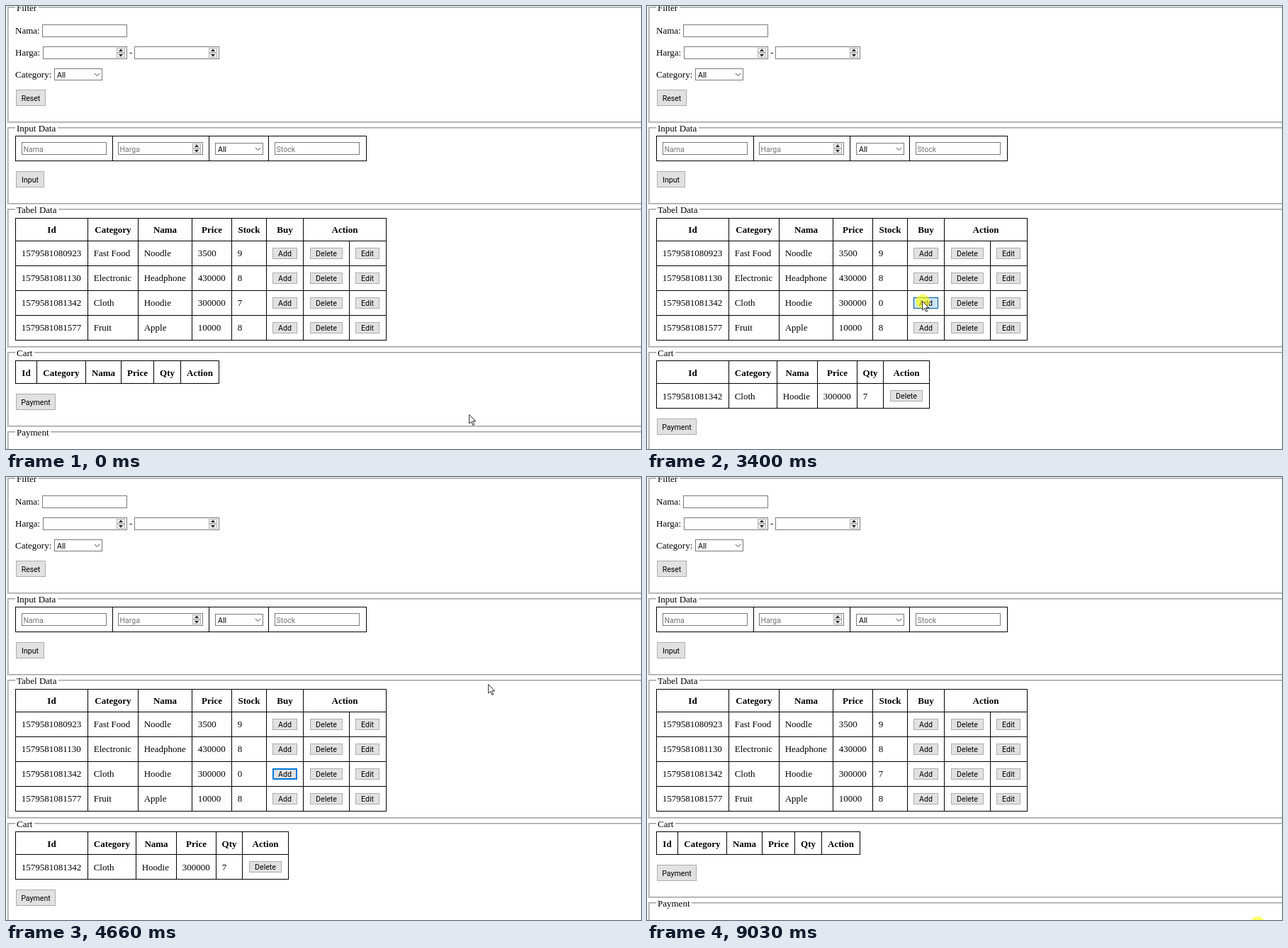
Write an HTML page that moves like this. It is 896 px wide and 625 px high and loops after 9180 ms.

```html
<!DOCTYPE html>
<html lang="id">
<head>
<meta charset="utf-8">
<title>Tabel Data</title>
<style>
  html, body { margin: 0; width: 100%; height: 100%; overflow: hidden; background: #fff; }
  svg { display: block; }
  text { font: 13px "Liberation Serif", "Times New Roman", serif; white-space: pre; }
  .th { font-weight: bold; }
  .ui { font: 10.6px Roboto, sans-serif; }
  .msg { font: 10px Roboto, sans-serif; }
  .mid { text-anchor: middle; }
</style>
</head>
<body>
<svg id="stage" width="896" height="625" viewBox="0 0 896 625"></svg>
<script>
const LOOP = 9180;
const stage = document.getElementById('stage');

// Mouse presses: [down, up]. The first seven each move one item to the cart.
const clicks = [[760, 910], [990, 1140], [1300, 1450], [1550, 1700], [1780, 1930], [2010, 2160],
  [2330, 2470], [3340, 3490], [4510, 4660], [6610, 6770], [9030, 9180]];
const ADDS = 7, DIALOG = [3490, 4660], REMOVED = 6770, HIDDEN = 8570;

// Pointer moves: first step, last step, step count, end point, optional bend.
const moves = [
  [70, 590, 8, 389, 416],
  [3810, 3960, 3, 737, 262],
  [4110, 4440, 5, 681, 292],
  [4740, 5530, 11, 377, 552],
  [5600, 5600, 1, 377.4, 552],
  [5770, 5770, 1, 378, 552],
  [7010, 7240, 4, 353, 418, 390, 475],
  [7320, 7620, 5, 344, 424, 346, 410],
  [8170, 8490, 5, 793, 590]
];

const goods = [
  ['1579581080923', 'Fast Food', 'Noodle', '3500', 9],
  ['1579581081130', 'Electronic', 'Headphone', '430000', 8],
  ['1579581081342', 'Cloth', 'Hoodie', '300000', 7],
  ['1579581081577', 'Fruit', 'Apple', '10000', 8]
];

const looks = {
  rest: ['#e1e1e1', '#adadad'],
  hover: ['#e5f1fb', '#0078d7'],
  down: ['#cce4f7', '#005499'],
  focus: ['#e1e1e1', '#0078d7']
};

const fill = (x, y, w, h, c) => `<rect x="${x}" y="${y}" width="${w}" height="${h}" fill="${c}"/>`;
const box = (x, y, w, h, bg, line) =>
  `<rect x="${x + .5}" y="${y + .5}" width="${w - 1}" height="${h - 1}" fill="${bg}" stroke="${line}"/>`;
const text = (x, y, s, cls = '', c = '#000') => `<text x="${x}" y="${y}" class="${cls}" fill="${c}">${s}</text>`;
const hline = (x1, x2, y, c = '#000') => fill(x1, y, x2 - x1 + 1, 1, c);
const vline = (x, y1, y2, c = '#000') => fill(x, y1, 1, y2 - y1 + 1, c);
const smooth = k => k * k * (3 - 2 * k);

function pointerAt(t) {
  let x = 654, y = 576;
  for (const [a, b, n, ex, ey, bx = (x + ex) / 2, by = (y + ey) / 2] of moves) {
    if (t < a) break;
    const step = b > a ? Math.min(n, Math.floor((t - a) / (b - a) * (n - 1) + .001) + 1) : n;
    const k = smooth(step / n), q = 1 - k;
    const px = q * q * x + 2 * q * k * bx + k * k * ex;
    const py = q * q * y + 2 * q * k * by + k * k * ey;
    if (t < b) return [px, py];
    x = ex; y = ey;
  }
  return [x, y];
}

function button(x, y, w, h, label, look = 'rest') {
  const [bg, line] = looks[look];
  return box(x, y, w, h, bg, line) +
    (look === 'focus' ? box(x + 1, y + 1, w - 2, h - 2, bg, line) : '') +
    text(x + w / 2, y + h / 2 + 4, label, 'ui mid');
}

const input = (x, y, w, hint = '') =>
  box(x, y, w, 18, '#fff', '#7a7a7a') + text(x + 2.5, y + 13.5, hint, 'ui', '#757575');

function spinner(x, y) {
  const half = top => box(x, top, 12, 7, '#f0f0f0', '#b4b4b4');
  return half(y) + half(y + 7) +
    `<path d="M${x + 3} ${y + 5}l3 -3.4l3 3.4zM${x + 3} ${y + 9}l3 3.4l3 -3.4z" fill="#222"/>`;
}

const select = (x, y) => box(x, y, 68, 17, '#fff', '#7a7a7a') + text(x + 4, y + 12.5, 'All', 'ui') +
  `<path d="M${x + 57} ${y + 7}l3.5 3.5l3.5 -3.5" fill="none" stroke="#444"/>`;

function fieldset(top, bottom, label, width) {
  let s = '';
  [['#a0a0a0', 0], ['#cecece', 1]].forEach(([c, d]) => {
    s += hline(2 + d, 12, top + d, c) + hline(15 + width + 2, 896, top + d, c) +
      vline(2 + d, top + d, bottom + 1 - d, c) + hline(2 + d, 896, bottom + d, c);
  });
  return s + text(15, top + 5.5, label);
}

function grid(xs, ys) {
  const [x1, x2] = [xs[0], xs[xs.length - 1]], [y1, y2] = [ys[0], ys[ys.length - 1]];
  return xs.map(x => vline(x, y1, y2)).join('') + ys.map(y => hline(x1, x2, y)).join('');
}

const heads = (xs, names, y) =>
  names.map((n, i) => text((xs[i] + xs[i + 1] + 1) / 2, y, n, 'th mid')).join('');
const cells = (xs, row, y) => row.map((v, i) => text(xs[i] + 8.7, y, v)).join('');

function scene(t) {
  const [mx, my] = pointerAt(t);
  const modal = t >= DIALOG[0] && t < DIALOG[1];
  const press = clicks.findIndex(([a, b]) => t >= a && t < b);
  const held = press >= 0 && (press > ADDS || t >= clicks[press][0] + 60);
  const qty = t < REMOVED ? clicks.slice(0, ADDS).filter(c => t >= c[1]).length : 0;
  const over = (x, y, w, h) => mx >= x && mx < x + w && my >= y && my < y + h;
  const live = (x, y, w, h, label, focus) => {
    const on = !modal && t < HIDDEN && over(x, y, w, h);
    const look = on ? (held ? 'down' : 'hover') : focus ? (modal ? 'hover' : 'focus') : 'rest';
    return button(x, y, w, h, label, look);
  };

  let s = fill(0, 0, 896, 625, '#fff');

  s += fieldset(1, 163, 'Filter', 29);
  s += text(13, 39, 'Nama:') + input(51, 26, 120);
  s += text(13, 70, 'Harga:') + input(52, 57, 119) + spinner(156, 59) + text(174, 70, '-') +
    input(181, 57, 120) + spinner(286, 59);
  s += text(13, 101, 'Category:') + select(68, 88) + live(14, 118, 42, 23, 'Reset');

  s += fieldset(171, 278, 'Input Data', 56);
  s += grid([13, 150, 286, 370, 508], [183, 218]);
  s += input(22, 192, 120, 'Nama') + input(158, 192, 120, 'Harga') + spinner(263, 194) +
    select(295, 193) + input(379, 192, 120, 'Stock') + live(14, 233, 40, 23, 'Input');

  s += fieldset(286, 480, 'Tabel Data', 57);
  const cols = [13, 115, 186, 262, 318, 367, 419, 536];
  s += grid(cols, [299, 331, 366, 401, 436, 471]) + vline(484, 331, 471);
  s += heads(cols, ['Id', 'Category', 'Nama', 'Price', 'Stock', 'Buy', 'Action'], 320);
  goods.forEach((item, i) => {
    const y = 341 + 35 * i, chosen = i === 2;
    const row = chosen ? [...item.slice(0, 4), item[4] - qty] : item;
    const focus = chosen && t >= clicks[0][0] && t < 6610;
    s += cells(cols, row, y + 12) + live(376, y, 35, 16, 'Add', focus) +
      live(429, y, 46, 16, 'Delete') + live(493, y, 34, 16, 'Edit');
  });

  const drop = qty ? 35 : 0;
  const cart = qty ? [13, 115, 183, 240, 296, 333, 398] : [13, 43, 112, 162, 208, 246, 300];
  s += fieldset(488, 592 + drop, 'Cart', 23);
  s += grid(cart, qty ? [500, 532, 567] : [500, 532]);
  s += heads(cart, ['Id', 'Category', 'Nama', 'Price', 'Qty', 'Action'], 522);
  if (qty) s += cells(cart, [...goods[2].slice(0, 4), qty], 555) + live(343, 542, 46, 16, 'Delete');
  s += live(14, 547 + drop, 56, 23, 'Payment');
  s += fieldset(600 + drop, 720, 'Payment', 46);

  if (modal) {
    const ok = [636, 288, 61, 18];
    s += fill(0, 0, 896, 625, 'rgba(26,26,26,.5)');
    s += box(523, 205, 195, 117, '#fff', '#777') + fill(524, 276, 193, 45, '#f0f0f0') +
      hline(524, 716, 275, '#dfdfdf');
    s += text(620.5, 244, 'Stock Habis', 'msg mid');
    s += button(...ok, 'OK', over(...ok) ? (held ? 'down' : 'hover') : 'focus');
  }

  if (press >= 0) {
    const [cx, cy] = t < HIDDEN ? [mx, my + .8] : [861.5, 630];
    s += `<circle cx="${cx}" cy="${cy}" r="10" fill="#ff0" opacity=".62"/>`;
  }
  if (t < HIDDEN) {
    s += `<path transform="translate(${mx - .3} ${my + .5})" fill="#fff" stroke="#111" stroke-width=".9"
      d="M0 0V12.6L2.9 9.9L5 14.9L7 14L4.9 9.3H9Z"/>`;
  }
  return s;
}

const start = performance.now();
let shown = '';
function frame() {
  const next = scene((performance.now() - start) % LOOP);
  if (next !== shown) stage.innerHTML = shown = next;
  requestAnimationFrame(frame);
}
frame();
</script>
</body>
</html>
```
